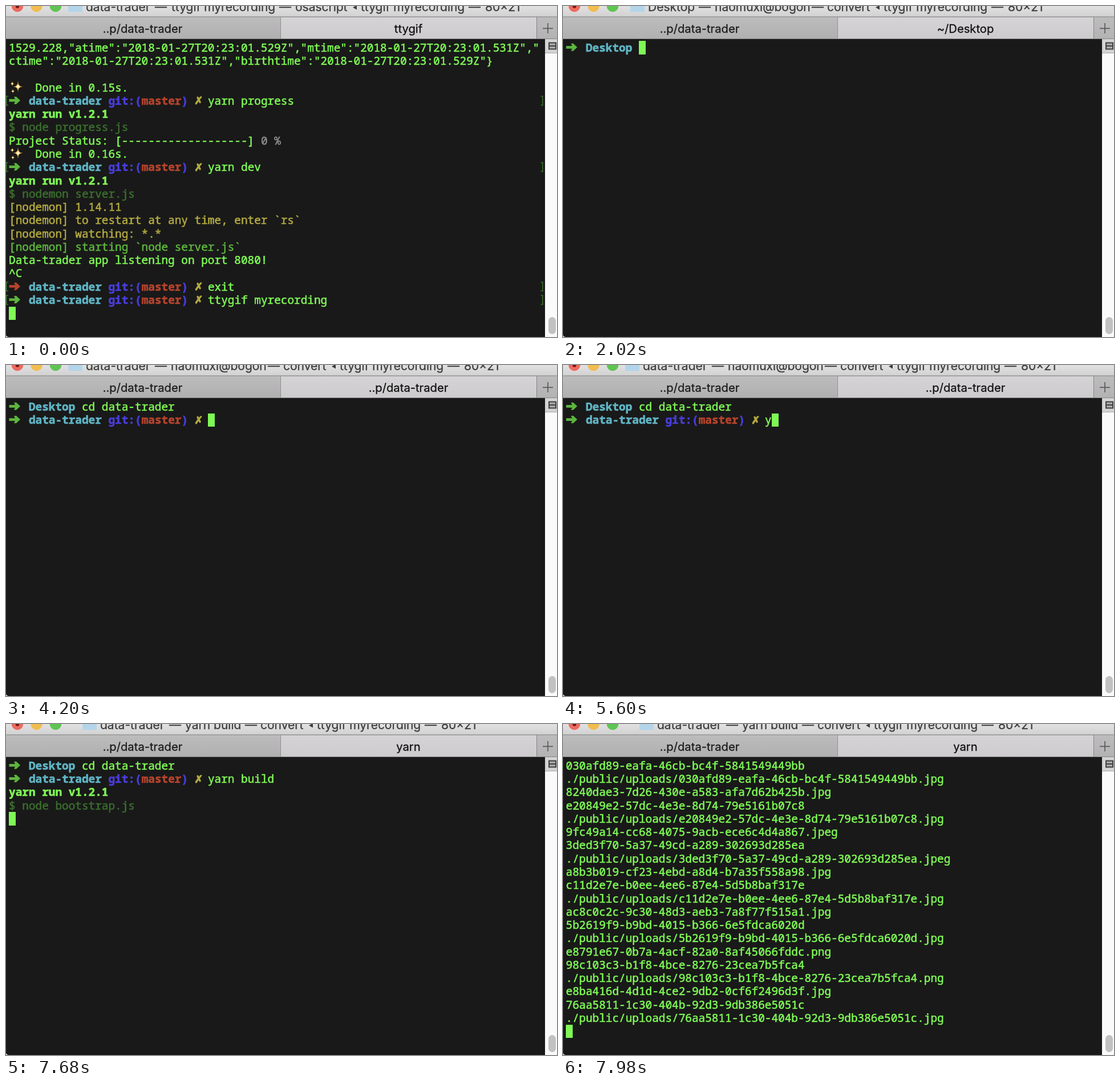
Animation of 966 by 580 pixels, one loop 8000 ms. Source, as an HTML page with a canvas:

```html
<!DOCTYPE html>
<html lang="en">
<head>
<meta charset="utf-8">
<title>Terminal recording</title>
<style>
  html, body { margin: 0; width: 100%; height: 100%; overflow: hidden; background: #191919; }
  canvas { display: block; }
</style>
</head>
<body>
<canvas id="stage" width="966" height="580"></canvas>
<script>
const ctx = document.getElementById('stage').getContext('2d');
const LOOP = 8000;
const CELL = 11.633, ROW = 23.27, LEFT = 5, TOP = 61.3, ROWS = 21;
const MONO = '"Noto Sans Mono", "DejaVu Sans Mono", monospace';
const SANS = 'Inter, Roboto, sans-serif';

const COLORS = {
  text: '#7ff856', green: '#5db53e', cyan: '#60b5c5', blue: '#493ddb', red: '#b5432c',
  yellow: '#b3aa40', dim: '#3a6d2d', grey: '#8b8b8b', mark: '#39712b'
};

// Terminal lines are lists of runs: { text, color, bold } or { icon, color }, each at a column.
const run = (col, text, color = 'text', bold = false) => ({ col, text, color, bold });
const icon = (col, name, color) => ({ col, icon: name, color });
const plain = (text, color) => [run(0, text, color)];
const done = time => [icon(0, 'sparkles'), run(4, `Done in ${time}s.`)];
const yarnRun = [run(0, 'yarn run v1.2.1', 'text', true)];
const desktop = cmd => [icon(0, 'arrow', 'green'), run(3, 'Desktop', 'cyan', true), run(11, cmd)];

function repo(cmd, { status = 'green', marked = false } = {}) {
  const line = [
    icon(0, 'arrow', status), run(3, 'data-trader', 'cyan', true),
    run(15, 'git:(', 'blue', true), run(20, 'master', 'red', true), run(26, ')', 'blue', true),
    icon(28, 'cross', 'yellow'), run(30, cmd)
  ];
  line.marked = marked;
  return line;
}

const history = [
  plain('1529.228,"atime":"2018-01-27T20:23:01.529Z","mtime":"2018-01-27T20:23:01.531Z","'),
  plain('ctime":"2018-01-27T20:23:01.531Z","birthtime":"2018-01-27T20:23:01.529Z"}'),
  [],
  done('0.15'),
  repo('yarn progress', { marked: true }),
  yarnRun,
  plain('$ node progress.js', 'dim'),
  [run(0, `Project Status: [${'-'.repeat(19)}]`), run(38, '0 %', 'grey')],
  done('0.16'),
  repo('yarn dev', { marked: true }),
  yarnRun,
  plain('$ nodemon server.js', 'dim'),
  plain('[nodemon] 1.14.11', 'yellow'),
  plain('[nodemon] to restart at any time, enter `rs`', 'yellow'),
  plain('[nodemon] watching: *.*', 'yellow'),
  plain('[nodemon] starting `node server.js`', 'green'),
  plain('Data-trader app listening on port 8080!'),
  plain('^C'),
  repo('exit', { status: 'red', marked: true }),
  repo('ttygif myrecording', { marked: true })
];

// Each upload prints its file name, the new id, and the stored path.
const uploads = [
  ['4b7c20e5-91fd-4a36-8c02-d3e85f617a9b.jpg', '030afd89-eafa-46cb-bc4f-5841549449bb'],
  ['8240dae3-7d26-430e-a583-afa7d62b425b.jpg', 'e20849e2-57dc-4e3e-8d74-79e5161b07c8'],
  ['9fc49a14-cc68-4075-9acb-ece6c4d4a867.jpeg', '3ded3f70-5a37-49cd-a289-302693d285ea'],
  ['a8b3b019-cf23-4ebd-a8d4-b7a35f558a98.jpg', 'c11d2e7e-b0ee-4ee6-87e4-5d5b8baf317e'],
  ['ac8c0c2c-9c30-48d3-aeb3-7a8f77f515a1.jpg', '5b2619f9-b9bd-4015-b366-6e5fdca6020d'],
  ['e8791e67-0b7a-4acf-82a0-8af45066fddc.png', '98c103c3-b1f8-4bce-8276-23cea7b5fca4'],
  ['e8ba416d-4d1d-4ce2-9db2-0cf6f2496d3f.jpg', '76aa5811-1c30-404b-92d3-9db386e5051c']
].flatMap(([file, id]) => [file, id, `./public/uploads/${id}.${file.split('.')[1]}`]).map(l => plain(l));

// Window titles: words with their x, then the shared ending placed from `tail`.
const USER = 'haomuxi@bogon';
const titles = {
  recording: { tail: 524, words: [[141, 'data-trader'], [262, '—'], [291, 'ttygif myrecording'], [480, '—'], [508, 'osascript']] },
  shell: { tail: 487, words: [[141, 'data-trader'], [262, '—'], [290, USER], [460, '—'], [487, 'convert']] },
  desktop: { tail: 464, words: [[150, 'Desktop'], [239, '—'], [267, USER], [437, '—'], [464, 'convert']] },
  build: { tail: 447, words: [[166, 'data-trader'], [287, '—'], [315, 'yarn build'], [420, '—'], [447, 'convert']] }
};

// [time, typed so far]
const cdKeys = [[760, ''], [2210, 'c'], [2380, 'cd'], [2630, 'cd '], [2770, 'cd d'], [3020, 'cd da'],
  [3370, 'cd data-'], [3570, 'cd data-t'], [3930, 'cd data-trader/']];
const buildKeys = [[4200, ''], [5600, 'y'], [5740, 'ya'], [5880, 'yar'], [6010, 'yarn'], [6270, 'yarn '],
  [6410, 'yarn b'], [6610, 'yarn bu'], [6840, 'yarn bui'], [7010, 'yarn buil'], [7180, 'yarn build']];
const outputSteps = [[0, 0], [7780, 4], [7880, 13], [7980, uploads.length]];
const latest = (steps, t) => steps.filter(([at]) => at <= t).pop()[1];

function sceneAt(t) {
  if (t < 630) return { title: titles.recording, tab: 'ttygif', lines: history, cursor: 0 };
  const moved = t >= 4170, building = t >= 7280;
  const scene = {
    title: building ? titles.build : t < 730 || moved ? titles.shell : titles.desktop,
    tab: building ? 'yarn' : moved ? '..p/data-trader' : '~/Desktop',
    lines: [], cursor: 0, inline: false
  };
  if (t < 760) return scene;
  if (t < 4130) {
    const typed = latest(cdKeys, t);
    return { ...scene, lines: [desktop(typed)], cursor: 11 + typed.length, inline: true };
  }
  scene.lines.push(desktop('cd data-trader'));
  if (t < 4200) return scene;
  const typed = latest(buildKeys, t);
  scene.lines.push(repo(typed));
  if (!building) return { ...scene, cursor: 30 + typed.length, inline: true };
  if (t >= 7600) scene.lines.push(yarnRun);
  if (t >= 7680) scene.lines.push(plain('$ node bootstrap.js', 'dim'));
  scene.lines.push(...uploads.slice(0, latest(outputSteps, t)));
  scene.lines = scene.lines.slice(1 - ROWS);
  return scene;
}

function rect(x, y, w, h, fill) {
  ctx.fillStyle = fill;
  ctx.fillRect(x, y, w, h);
}

function shape(fill, build) {
  ctx.fillStyle = fill;
  ctx.beginPath();
  build();
  ctx.fill();
}

function polygon(fill, points) {
  shape(fill, () => points.forEach(([x, y]) => ctx.lineTo(x, y)));
}

const disc = (x, y, r, fill) => shape(fill, () => ctx.arc(x, y, r, 0, 7));

// A thin outline in the text colour gives the heavier desktop-style smoothing.
function label(text, x, y, font, color, { align = 'left', outline = 0.3 } = {}) {
  ctx.font = font;
  ctx.textAlign = align;
  ctx.lineJoin = 'round';
  ctx.lineWidth = outline;
  ctx.fillStyle = ctx.strokeStyle = color;
  ctx.fillText(text, x, y);
  ctx.strokeText(text, x, y);
}

function shade(y0, y1, from, to) {
  const g = ctx.createLinearGradient(0, y0, 0, y1);
  g.addColorStop(0, from);
  g.addColorStop(1, to);
  return g;
}

function star(x, y, r) {
  shape('#e9b54a', () => {
    ctx.moveTo(x, y - r);
    for (const [dx, dy] of [[r, 0], [0, r], [-r, 0], [0, -r]]) ctx.quadraticCurveTo(x, y, x + dx * 0.85, y + dy);
  });
  disc(x, y, r * 0.26, '#fff3c4');
}

const icons = {
  arrow(x, y, color) {
    polygon(color, [[x + 0.5, y - 2.3], [x + 11, y - 2.3], [x + 9, y - 6.5], [x + 13, y - 6.5], [x + 20, y],
      [x + 13, y + 6.5], [x + 9, y + 6.5], [x + 11, y + 2.3], [x + 0.5, y + 2.3]]);
  },
  cross(x, y, color) {
    label('✗', x - 0.5, y + 7, 'bold 18px "DejaVu Sans", sans-serif', color, { outline: 1.3 });
  },
  sparkles(x, y) {
    star(x + 16, y - 1, 10);
    star(x + 6, y - 6, 5);
    star(x + 7, y + 7, 4.5);
  }
};

function drawLine(line, row) {
  const top = TOP + row * ROW, mid = top + ROW / 2 - 0.6;
  for (const part of line) {
    const x = LEFT + part.col * CELL, color = COLORS[part.color];
    if (part.icon) icons[part.icon](x, mid, color);
    else label(part.text, x, top + 18.5, `${part.bold ? 'bold ' : ''}${CELL / 0.6}px ${MONO}`, color, { outline: 0.6 });
  }
  if (line.marked) {
    for (const [stem, serif] of [[0, 0], [940, 937.5]]) {
      rect(stem, mid - 8, 1.5, 17, COLORS.mark);
      for (const y of [mid - 8, mid + 7.5]) rect(serif, y, 4, 1.5, COLORS.mark);
    }
  }
}

function drawCursor(col, row) {
  const y = Math.round(TOP + row * ROW);
  rect(Math.round(LEFT + col * CELL), y, 12, Math.round(TOP + (row + 1) * ROW) - y, COLORS.text);
}

function drawTitle({ words, tail }) {
  const ink = '#3d3c3d';
  rect(0, 0, 966, 18, shade(0, 18, '#e2e1e2', '#d3d2d3'));
  disc(20, 0, 10.3, '#ed6a5f');
  disc(20, 0.5, 3.2, '#741611');
  disc(53.5, 0, 10.3, '#f1bd4f');
  disc(87, 0, 10.3, '#5fc552');
  rect(words[0][0] - 32, 0, 25, 10.5, '#b4d5e9');
  const ending = [[99, 'ttygif myrecording'], [288, '—'], [317, '80×21']];
  const placed = [...words, ...ending.map(([dx, word]) => [tail + dx, word])];
  for (const [x, word] of placed) label(word, x - 1, 9.3, `21px ${SANS}`, ink);
  polygon(ink, [[tail + 84, 2.5], [tail + 91, -1.5], [tail + 91, 6.5]]);
}

function drawTabs(name) {
  rect(0, 18, 966, 40, '#a3a2a3');
  rect(0, 20, 481, 37, shade(20, 57, '#bdbcbd', '#b1b0b1'));
  rect(482, 20, 448, 37, shade(20, 57, '#d5d3d5', '#cdcbcd'));
  rect(931, 20, 35, 37, shade(20, 57, '#bdbcbd', '#b4b3b4'));
  rect(481, 19, 1, 38, '#929192');
  rect(930, 19, 1, 38, '#858485');
  rect(0, 57, 966, 1, '#858485');
  label('..p/data-trader', 239.5, 47, `20.2px ${SANS}`, '#1c1c1c', { align: 'center' });
  label(name, 705.5, 47, `20.2px ${SANS}`, '#121212', { align: 'center' });
  rect(941, 38.5, 18, 1.6, '#565556');
  rect(949.2, 30, 1.6, 18, '#565556');
}

function drawScrollbar() {
  rect(945, 58, 21, 522, '#fafafa');
  rect(945, 58, 21, 24, '#d4d3d4');
  rect(945, 82, 21, 1, '#aaa9aa');
  rect(951, 63.5, 14, 13, '#414141');
  rect(953, 65.5, 10, 3.5, '#a9a9a9');
  rect(953, 71, 10, 3.5, '#a9a9a9');
  shape('#c1c1c1', () => ctx.roundRect(951, 545, 13, 30, 6.5));
}

function render(t) {
  const { title, tab, lines, cursor, inline } = sceneAt(t);
  rect(0, 0, 966, 580, '#191919');
  lines.forEach(drawLine);
  drawCursor(cursor, inline ? lines.length - 1 : lines.length);
  polygon('#e5e5e5', [[0, 576.5], [1, 578.5], [4, 580], [0, 580]]);
  drawTitle(title);
  drawTabs(tab);
  drawScrollbar();
}

const start = performance.now();
function tick() {
  render((performance.now() - start) % LOOP);
  requestAnimationFrame(tick);
}
tick();
</script>
</body>
</html>
```
